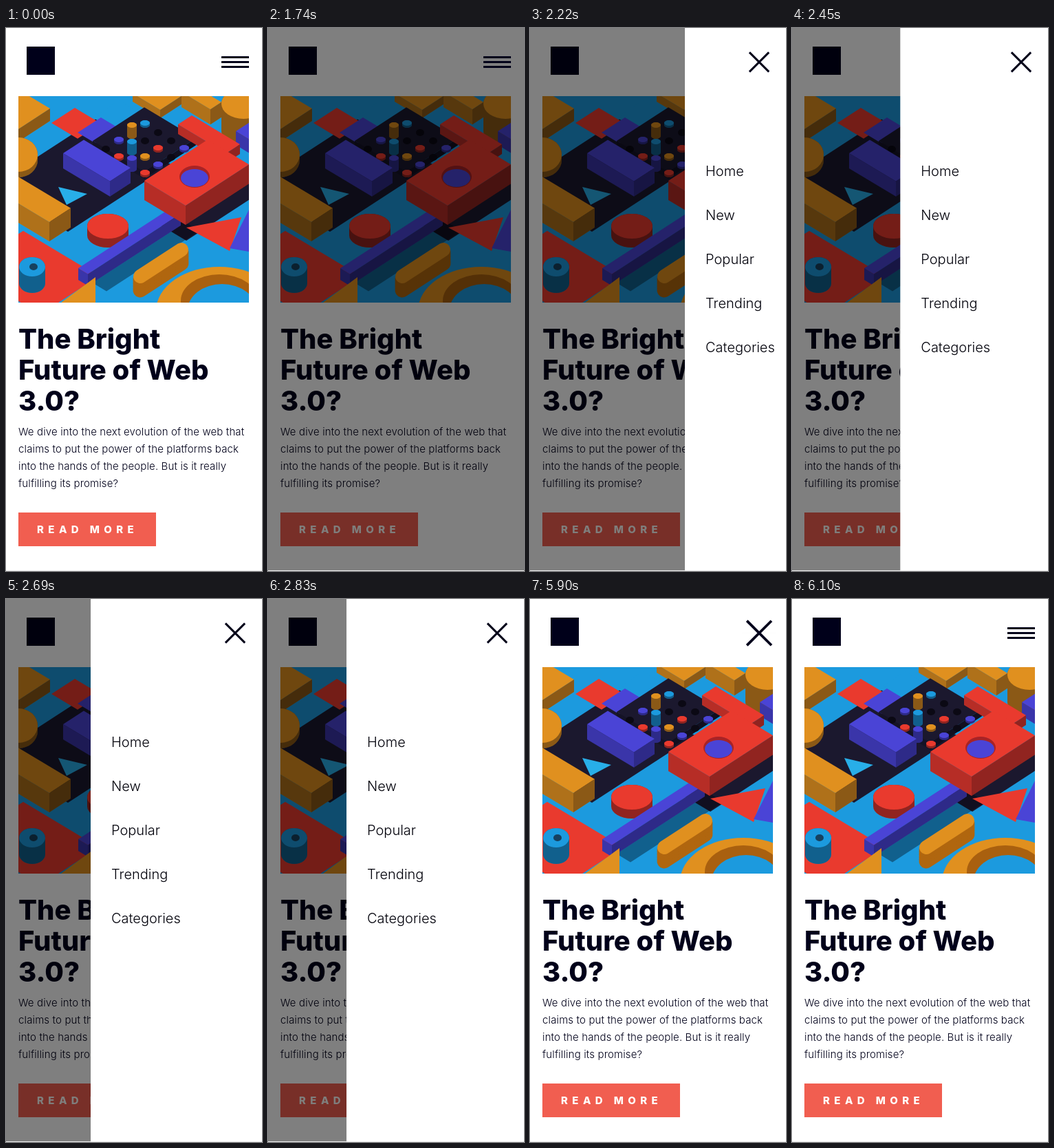
An HTML page with a canvas that plays this animation: 372 by 789 pixels, repeating every 8190 ms.

```html
<!DOCTYPE html>
<html lang="en">
<head>
<meta charset="utf-8">
<title>Mobile menu</title>
<style>
  html, body { margin: 0; width: 100%; height: 100%; overflow: hidden; background: #fff; }
  #stage { position: relative; width: 372px; height: 789px; overflow: hidden; background: #fff;
    color: #00001a; font: 300 15px/25px Inter, sans-serif; }
  #stage > * { position: absolute; margin: 0; white-space: nowrap; }
  #logo { left: 30px; top: 27px; width: 41px; height: 41px; background: #00001a; }
  #art { left: 18px; top: 99px; }
  h1 { left: 18px; top: 429px; font: 800 40px/45px Inter, sans-serif; }
  #intro { left: 18px; top: 574px; letter-spacing: .13px; }
  #more { left: 18px; top: 704px; width: 200px; height: 49px; background: #f15e50; }
  #more span { position: absolute; left: 27px; color: #fffdfa; font-weight: 800; line-height: 49px; letter-spacing: 6.4px; }
  #edge { left: 0; top: 788px; width: 372px; height: 1px; background: #eee; }
  #shade { left: 0; top: 0; width: 372px; height: 788px; background: rgba(0, 0, 0, .5); }
  #panel { left: 0; top: 0; width: 261px; height: 788px; background: #fff; color: #00000a; }
  #panel div { position: absolute; left: 30px; top: 176px; font-size: 20px; line-height: 64px; }
  .bar { left: 313px; top: 48px; width: 40px; height: 3px; background: #00001a; }
</style>
</head>
<body>
<div id="stage">
  <div id="logo"></div>
  <canvas id="art" width="335" height="300"></canvas>
  <h1>The Bright<br>Future of Web<br>3.0?</h1>
  <p id="intro">We dive into the next evolution of the web that<br>claims to put the power of the platforms back<br>into the hands of the people. But is it really<br>fulfilling its promise?</p>
  <div id="more"><span>READ MORE</span></div>
  <div id="edge"></div>
  <div id="shade"></div>
  <div id="panel"><div>Home<br>New<br>Popular<br>Trending<br>Categories</div></div>
  <div class="bar"></div>
  <div class="bar"></div>
  <div class="bar"></div>
</div>
<script>
const $ = id => document.getElementById(id);
const ctx = $('art').getContext('2d');

const SKY = '#1c9ade', DARK = '#1b182e', GOLD = '#e0901f', RED = '#e93a2e', VIO = '#4a44d6';
const HUES = { S: SKY, G: GOLD, R: RED, V: VIO };
const DIM = 'rgba(0, 0, 10, .22)', DIMMER = 'rgba(0, 0, 10, .38)';
const UP = -.65, DOWN = .6; // slopes of the two ground axes

function poly(color, ...p) {
  ctx.fillStyle = color;
  ctx.beginPath();
  for (let i = 0; i < p.length; i += 2) ctx.lineTo(p[i], p[i + 1]);
  ctx.fill();
}

function oval(color, x, y, rx, ry) {
  ctx.fillStyle = color;
  ctx.beginPath();
  ctx.ellipse(x, y, rx, ry, 0, 0, 7);
  ctx.fill();
}

// box whose top face starts at its left corner; a and b are widths along the axes
function block(hue, x, y, a, b, h = 0) {
  const fx = x + b, fy = y + b * DOWN, rx = fx + a, ry = fy + a * UP;
  const left = [x, y, fx, fy, fx, fy + h, x, y + h];
  const right = [fx, fy, rx, ry, rx, ry + h, fx, fy + h];
  poly(hue, x, y, x + a, y + a * UP, rx, ry, fx, fy);
  if (!h) return;
  poly(hue, ...left);
  poly(DIM, ...left);
  poly(hue, ...right);
  poly(DIMMER, ...right);
}

function drum(hue, x, y, rx, ry, h) {
  for (const color of [hue, DIMMER]) {
    ctx.fillStyle = color;
    ctx.beginPath();
    ctx.ellipse(x, y + h, rx, ry, 0, 0, Math.PI);
    ctx.ellipse(x, y, rx, ry, 0, Math.PI, 2 * Math.PI);
    ctx.fill();
  }
  oval(hue, x, y, rx, ry);
}

function rod(color, x, y, length, width) {
  ctx.strokeStyle = color;
  ctx.lineWidth = width;
  ctx.lineCap = 'round';
  ctx.beginPath();
  ctx.moveTo(x, y);
  ctx.lineTo(x + length, y + length * UP);
  ctx.stroke();
}

function drawPegs() {
  block(DARK, 126, 164, 75, 75, 10);
  ['.VGS', 'RS..', 'VGR.', 'RV.V'].forEach((row, j) => [...row].forEach((key, i) => {
    const x = 145 + 19 * (i + j), y = 176 + 12 * (j - i);
    if (key === '.') oval('#0b0914', x, y, 6, 5);
    else if (i + j === 2) drum(HUES[key], x, y - 11, 7, 4, 16);
    else drum(HUES[key], x, y - 2, 7, 4, 3);
  }));
}

function drawArt() {
  ctx.translate(-18, -99);
  ctx.fillStyle = SKY;
  ctx.fillRect(18, 99, 335, 300);
  block(DARK, -20, 230, 150, 110);
  block(DARK, 222, 285, 150, 40);

  // back row
  block(GOLD, -32, 117, 46, 50, 18);
  block(RED, 66, 138, 34, 38);
  block(VIO, 104, 152, 34, 26);
  block(SKY, 132, 126, 32, 34);
  block(GOLD, 184, 95, 40, 40, 12);
  block(GOLD, 255, 93, 16, 42, 22);
  drum(GOLD, 345, 110, 32, 22, 40);
  block(VIO, 334, 150, 30, 30, 20);
  drawPegs();
  block(RED, 250, 140, 20, 70, 14);

  // left side
  drum(GOLD, 18, 184, 28, 25, 8);
  block(VIO, 83, 182, 30, 68, 22);
  block(RED, -60, 350, 85, 110);
  block(GOLD, -22, 231, 31, 85, 28);
  poly('#28aee8', 76, 231, 118, 241, 88, 257);

  // front
  drum(SKY, 38, 347, 19, 14, 24);
  oval('#17415f', 40, 347, 6, 5);
  drum(RED, 148, 288, 30, 18, 13);
  block(DIMMER, 122, 368, 135, 24);
  block(VIO, 105, 349, 135, 14, 17);
  poly(GOLD, 80, 399, 130, 362, 130, 399);
  block(RED, 201, 222, 92, 60, 28);
  oval('#a82326', 274, 216, 22, 16);
  oval(VIO, 274, 218, 20, 13);
  poly(RED, 262, 290, 342, 275, 325, 324);
  poly(VIO, 353, 264, 353, 325, 325, 320);
  for (let y = 381; y > 361; y -= 4) rod('#b0660f', 195, y, 60, 21);
  rod(GOLD, 195, 361, 60, 20);
  oval(GOLD, 310, 411, 92, 64);
  oval('#a9600f', 310, 396, 56, 38);
  oval(SKY, 314, 410, 50, 38);
}

const LOOP = 8190, OPEN = 1740, CLOSE = 5900, MORPH = 200;
const clamp = v => Math.min(1, Math.max(0, v));
const mix = (a, b, k) => a + (b - a) * k;

// cubic-bezier(.25, .1, .25, 1)
function ease(x) {
  let lo = 0, hi = 1, s = .5;
  for (let i = 0; i < 24; i++) {
    s = (lo + hi) / 2;
    if (.75 * s * (1 - s) + s ** 3 < x) lo = s; else hi = s;
  }
  return .3 * s * (1 - s) ** 2 + 3 * s * s * (1 - s) + s ** 3;
}

const bars = document.querySelectorAll('.bar');

// k: 0 = three lines, 1 = cross
function setIcon(k, crossScale) {
  const scale = mix(1, crossScale, k);
  bars.forEach((bar, i) => {
    const side = i - 1;
    bar.style.transform =
      `translateY(${side * 7 * (1 - k)}px) rotate(${-side * 45 * k}deg) scale(${scale})`;
    bar.style.opacity = side ? 1 : 1 - k;
  });
}

function draw(t) {
  const open = t >= OPEN && t < CLOSE;
  $('shade').style.display = $('panel').style.display = open ? 'block' : 'none';
  const slide = ease(clamp((t - 1695) / 1290));
  $('panel').style.transform = `translateX(${mix(483, 111, slide)}px)`;
  if (t < CLOSE) setIcon(ease(clamp((t - OPEN) / MORPH)), 1);
  else setIcon(1 - ease(clamp((t - CLOSE) / MORPH)), 1.26);
}

const start = performance.now();
function tick() {
  draw((performance.now() - start) % LOOP);
  requestAnimationFrame(tick);
}

drawArt();
draw(0);
tick();
</script>
</body>
</html>
```
